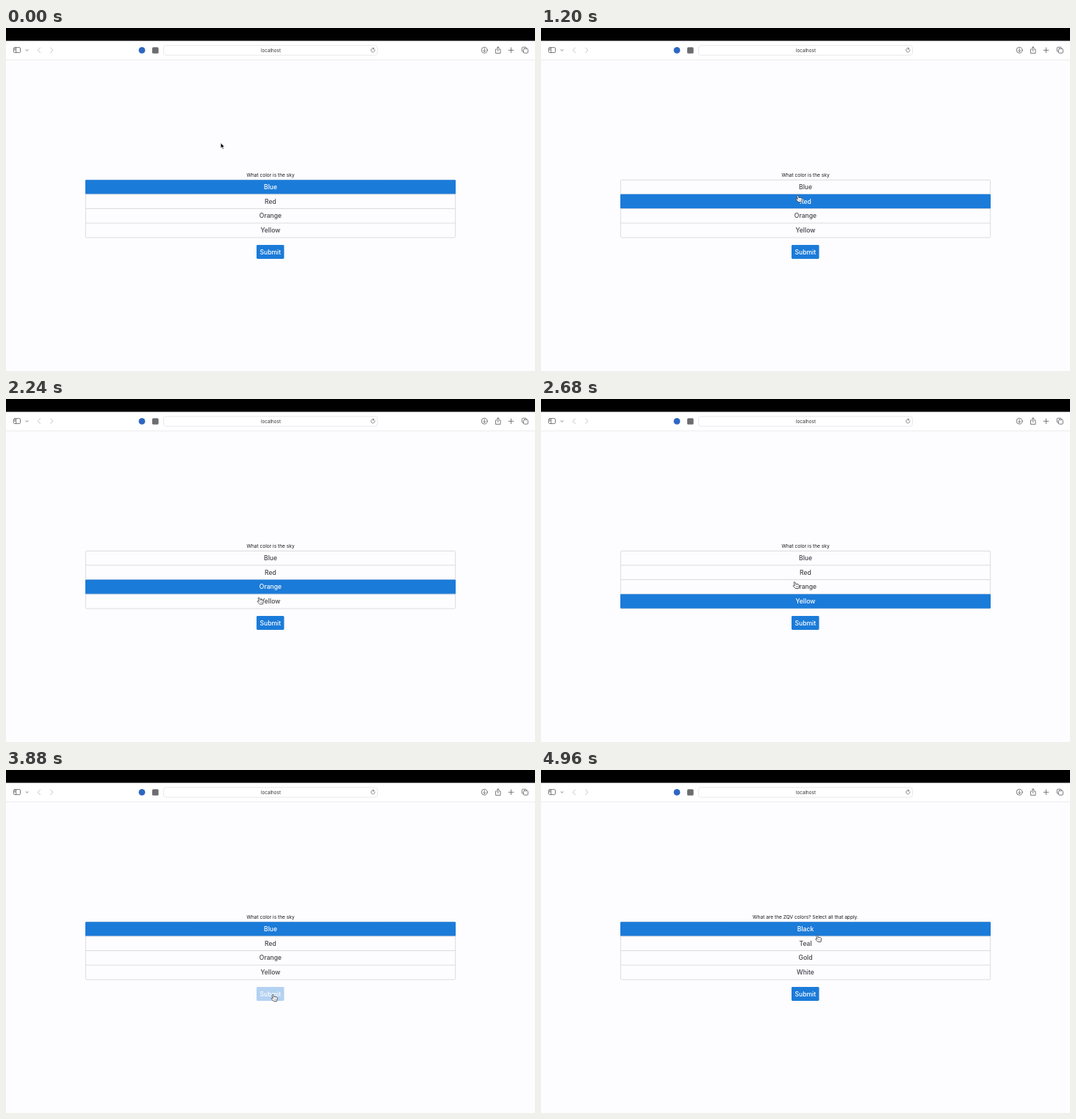
These frames come from a looping animation (720 by 468 pixels, 5000 ms). An HTML page:

```html
<!DOCTYPE html>
<html lang="en">
<head>
<meta charset="utf-8">
<title>Quiz</title>
<style>
  html, body { margin: 0; width: 100%; height: 100%; overflow: hidden; background: #fdfcfe; }
  svg { display: block; width: 720px; height: 468px; }
  text { font-family: Inter, Roboto, "Liberation Sans", sans-serif; text-anchor: middle; }
  .icon { fill: none; stroke: #626266; stroke-width: .85; stroke-linecap: round; stroke-linejoin: round; }
  .dim { stroke: #b9b9bd; }
  .label { font-size: 8.6px; font-weight: 500; }
  .line { fill: none; stroke: #d3d4d9; stroke-width: .8; }
</style>
</head>
<body>
<svg viewBox="0 0 720 468">
  <rect width="720" height="468" fill="#fdfcfe"/>
  <rect y="17" width="720" height="26" fill="#fff"/>
  <rect width="720" height="17.5"/>
  <path d="M0 43.5H720" stroke="#e9e8eb" stroke-width=".8"/>

  <g class="icon">
    <rect x="10.5" y="26.6" width="9" height="7" rx="1.3"/>
    <path d="M13.7 26.6v7M11.7 28.5h.8M11.7 30h.8M27 29.6l1.6 1.5 1.6-1.5"/>
    <path class="dim" d="M46.6 27l-3.4 3.3 3.4 3.3M60.6 27l3.4 3.3-3.4 3.3"/>
  </g>
  <circle cx="185" cy="30.4" r="4.4" fill="#2e67c2"/>
  <rect x="199" y="26.2" width="8.6" height="8.6" rx="1.6" fill="#6d6d70"/>
  <rect x="214.5" y="23.8" width="291" height="13.4" rx="3.2" fill="#fff" stroke="#e6e5e9" stroke-width=".9"/>
  <text x="360.5" y="32.8" font-size="6.3" fill="#2e2e31">localhost</text>
  <g class="icon">
    <path d="M502 29.7a2.6 2.6 0 1 1-1.3-1.7M499.6 26.8l1.5 1.3-1.6 1.1" stroke-width=".75"/>
    <circle cx="651.2" cy="30.2" r="4"/>
    <path d="M651.2 28v4M649.6 30.7l1.6 1.6 1.6-1.6"/>
    <path d="M668 29h-1.6v5.4h6.6V29h-1.6M669.7 31.6v-5.8M668 27.4l1.7-1.7 1.7 1.7"/>
    <path d="M684 30.3h6.8M687.4 26.9v6.8"/>
    <rect x="704.4" y="28.2" width="6" height="6" rx="1.2"/>
    <path d="M704.2 32.2h-.7a1.2 1.2 0 0 1-1.2-1.2v-3.6a1.2 1.2 0 0 1 1.2-1.2h3.6a1.2 1.2 0 0 1 1.2 1.2v.6"/>
  </g>

  <text id="question" x="360" y="203" font-size="6.6" fill="#18181a"></text>
  <rect class="line" x="108.4" y="207.4" width="503.2" height="78.6" rx="1.5" fill="#fff"/>
  <g id="rows"></g>
  <g id="submit">
    <rect x="341" y="296" width="37.5" height="19" rx="1.4" fill="#1b7bd9"/>
    <text class="label" x="359.8" y="308.7" fill="#fff">Submit</text>
  </g>

  <g id="arrow">
    <path d="M-1.8-4.2v7.2l1.7-1.5 1.2 2.7 1.2-.5-1.2-2.6h2.3z" fill="#000" stroke="#fff" stroke-width=".6"/>
  </g>
  <g id="hand">
    <path d="M-2.7-3.5c-.3-1.2 1.3-1.6 1.7-.4l.8 2.4 2.9.2c1.1.2 1.6.9 1.6 1.9l-.2 1.9-.7 2h-3.9l-3-2.9c-.9-1.1.3-2 1.3-1.3l.7.4z"
      fill="#fff" stroke="#3d3d41" stroke-width=".85" stroke-linejoin="round"/>
    <path d="M.2 1.1v1.6M1.5 1.1v1.6M2.8 1.1v1.6" stroke="#5a5a5e" stroke-width=".5"/>
  </g>
</svg>
<script>
const LOOP = 5000, STEP = 40, FADE = 120;
const ROW_TOP = 207.2, ROW_H = 19.65;
const DARK = [67, 69, 75];

const quizzes = [
  { from: 0, ask: "What color is the sky", options: ["Blue", "Red", "Orange", "Yellow"] },
  { from: 4000, ask: "What are the ZQV colors? Select all that apply.", options: ["Black", "Teal", "Gold", "White"] }
];

// time, selected row (-1 = none)
const picks = [[-FADE, 0], [960, 1], [2000, 2], [2440, 3], [3040, 0], [4000, -1], [4720, 0]];

// time, x, y of the pointer's middle
const path = [
  [0, 294, 161], [40, 294, 161], [560, 352, 224], [760, 350, 232], [920, 350, 232],
  [1200, 351, 233], [1600, 351, 233], [1720, 345.8, 262], [1920, 345.8, 262],
  [2320, 346, 277], [2480, 346, 277], [2920, 348.3, 224], [3480, 349, 224],
  [3800, 365, 311], [4120, 365, 311], [4560, 379.8, 217], [4680, 378, 228],
  [4920, 377.5, 230], [LOOP, 377.5, 230]
];

// time, opacity of the button
const press = [[0, 1], [3800, 1], [3880, .32], [4120, .32], [4280, 1], [LOOP, 1]];

const $ = id => document.getElementById(id);
const clamp = v => Math.min(1, Math.max(0, v));
const smooth = p => p * p * (3 - 2 * p);
const mix = (a, b, p) => a + (b - a) * p;

function sample(keys, t, ease = p => p) {
  const i = Math.max(1, keys.findIndex(k => k[0] > t));
  const a = keys[i - 1], b = keys[i];
  const p = ease(clamp((t - a[0]) / (b[0] - a[0])));
  return a.slice(1).map((v, n) => mix(v, b[n + 1], p));
}

function add(parent, tag, attrs) {
  const el = document.createElementNS("http://www.w3.org/2000/svg", tag);
  for (const name in attrs) el.setAttribute(name, attrs[name]);
  return parent.appendChild(el);
}

const rows = [0, 1, 2, 3].map(i => {
  const y = ROW_TOP + i * ROW_H;
  if (i) add($("rows"), "path", { class: "line", d: `M108.4 ${y}H611.6` });
  const fill = add($("rows"), "rect", { x: 108, y, width: 504, height: ROW_H, rx: 1, fill: "#1b7bd9" });
  const label = add($("rows"), "text", { class: "label", x: 360, y: y + 12.8 });
  return { fill, label };
});

function rowLevel(row, t) {
  const i = picks.findLastIndex(p => p[0] <= t);
  const [start, now] = picks[i];
  const before = i ? picks[i - 1][1] : now;
  if (now === before) return +(row === now);
  const p = now < 0 ? 1 : clamp((t - start) / FADE);
  return row === now ? p : row === before ? 1 - p : 0;
}

function draw(t) {
  const quiz = quizzes.findLast(q => q.from <= t);
  $("question").textContent = quiz.ask;
  rows.forEach(({ fill, label }, i) => {
    const level = rowLevel(i, t);
    fill.setAttribute("opacity", level);
    label.textContent = quiz.options[i];
    label.setAttribute("fill", `rgb(${DARK.map(c => Math.round(mix(c, 255, level)))})`);
  });

  $("submit").setAttribute("opacity", sample(press, t)[0]);

  const [x, y] = sample(path, t, smooth);
  const tip = y - 4;
  const over = tip > ROW_TOP && tip < 286 || tip > 296 && tip < 315;
  for (const id of ["arrow", "hand"]) {
    $(id).setAttribute("transform", `translate(${x} ${y})`);
    $(id).setAttribute("visibility", (id === "hand") === over ? "visible" : "hidden");
  }
}

const begin = performance.now();
function tick() {
  const t = (performance.now() - begin) % LOOP;
  draw(Math.floor(t / STEP) * STEP);
  requestAnimationFrame(tick);
}
tick();
</script>
</body>
</html>
```
